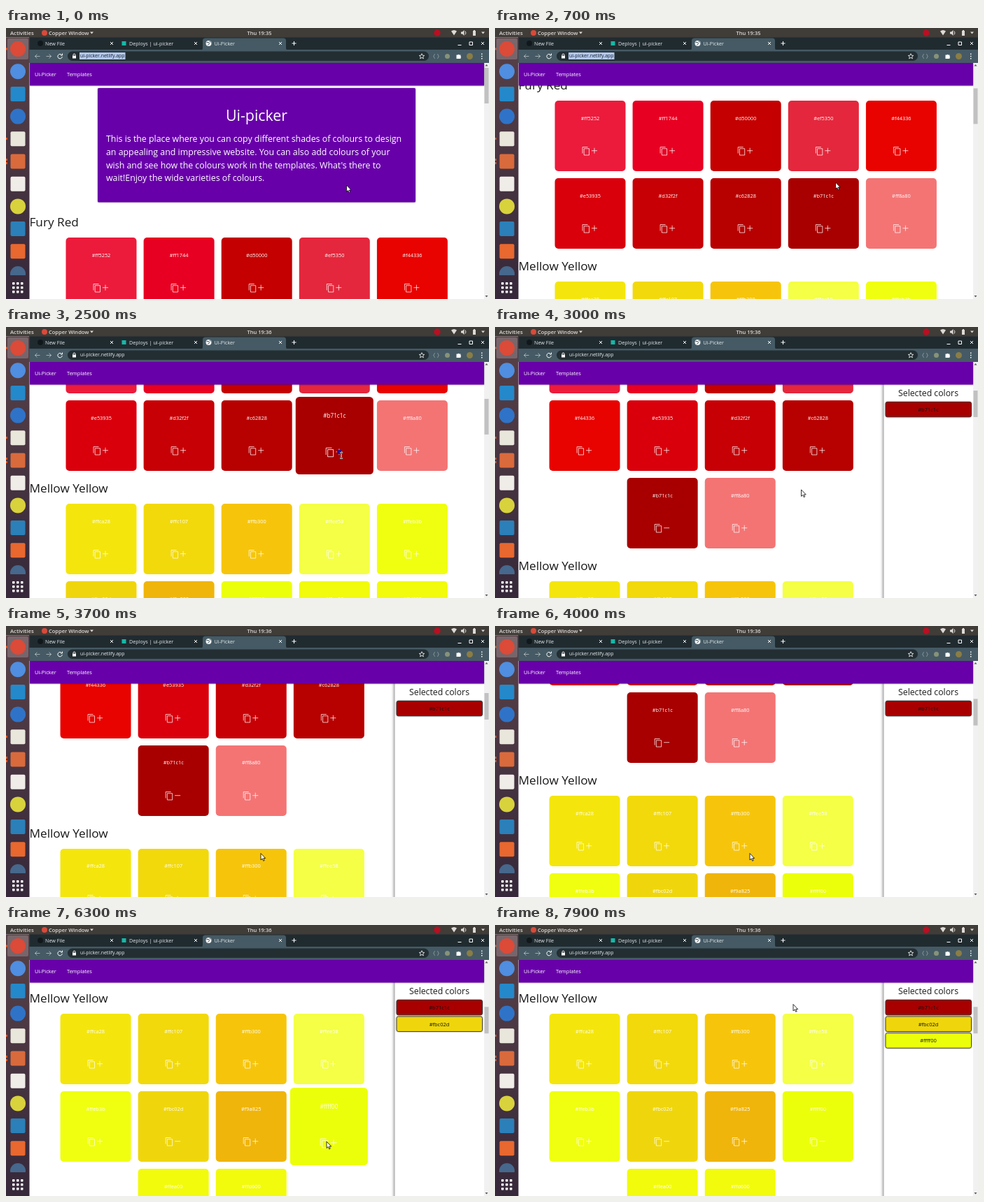
An HTML page for the animation above (8000 ms loop, 690 by 388 pixels).

```html
<!DOCTYPE html>
<html lang="en">
<head>
<meta charset="utf-8">
<title>Ui-Picker</title>
<style>
  html, body { margin: 0; width: 100%; height: 100%; overflow: hidden; background: #fff; }
  svg { display: block; width: 690px; height: 388px; font-family: "Open Sans", "Noto Sans", sans-serif; }
  text { white-space: pre; }
  .mid { text-anchor: middle; }
  .line { fill: none; stroke: #fff; }
  .thin { stroke-width: .8; opacity: .92; }
  .bar { font-size: 7.5px; font-weight: 600; fill: #dedad8; }
  .tab { font-size: 7.2px; fill: #e4eaec; }
  .hex { font-size: 7.4px; fill: #fff; }
  .title { font-size: 17.2px; fill: #1a1a1a; }
  .lift { filter: drop-shadow(0 .5px 1px #0006); }
</style>
</head>
<body>
<svg viewBox="0 0 690 388">
  <defs>
    <linearGradient id="dockFill" x2="0" y2="1">
      <stop stop-color="#584147"/><stop offset="1" stop-color="#36283a"/>
    </linearGradient>
    <clipPath id="dockClip"><path d="M0 13H34V354H0Z"/></clipPath>
  </defs>
  <rect width="690" height="388" fill="#fff"/>

  <g id="page">
    <g id="intro">
      <rect class="lift" x="131" y="86" width="454" height="163.5" rx="1.5" fill="#6800aa"/>
      <text class="mid" x="358" y="133" font-size="21.4" fill="#fff">Ui-picker</text>
      <g id="blurb" font-size="12.36" fill="#fff"></g>
    </g>
  </g>

  <g id="panel">
    <rect x="555.5" y="70" width="128" height="330" fill="#fff" style="filter:drop-shadow(-1px 0 2px #0008)"/>
    <text class="mid" x="619" y="99.3" font-size="12.27" fill="#1a1a1a">Selected colors</text>
  </g>

  <g id="scrollbar">
    <rect x="683" y="50" width="7" height="338" fill="#f1f1f1"/>
    <path d="M684.5 54.5L686.5 52L688.5 54.5Z" fill="#555"/>
    <path d="M684.5 383L686.5 385.5L688.5 383Z" fill="#555"/>
    <rect id="thumb" x="683.5" width="6" fill="#c1c1c1"/>
  </g>

  <rect class="lift" x="34" y="50" width="649" height="32.5" fill="#6800aa"/>
  <g font-size="7.5" fill="#fff">
    <text x="41" y="68.5">Ui-Picker</text><text x="87" y="68.5">Templates</text>
  </g>

  <!-- browser frame -->
  <rect x="33" y="13" width="657" height="19" fill="#202b30"/>
  <path d="M278 32Q281 32 281 28V18Q281 14.5 285 14.5H396Q400 14.5 400 18V28Q400 32 403 32Z" fill="#455a64"/>
  <rect x="33" y="31" width="657" height="19" fill="#455a64"/>
  <rect x="88" y="33.5" width="516" height="13.5" rx="6.75" fill="#232e33"/>
  <circle cx="49" cy="22" r="4" fill="#11181b"/>
  <rect x="165.5" y="19" width="6" height="6" fill="#16b8a6"/>
  <circle cx="289.5" cy="22" r="4" fill="#f1f3f4"/>
  <path d="M286.5 20.5h3l1 2-2 2M291 18.5l1 2" fill="none" stroke="#455a64"/>
  <g class="tab">
    <text x="56" y="24.7">New File</text>
    <text x="176" y="24.7">Deploys | ui-picker</text>
    <text x="297.5" y="24.7">Ui-Picker</text>
  </g>
  <rect id="mark" x="105" y="35" width="65.5" height="10" fill="#b3c8ee"/>
  <text id="url" x="106" y="42.4" font-size="6.95">ui-picker.netlify.app</text>
  <g class="line">
    <path d="M149 20l4 4m0-4l-4 4M269 20l4 4m0-4l-4 4M390 20l4 4m0-4l-4 4M411.5 19v6m-3-3h6"/>
    <path d="M645.5 24.5h5M662 20h4.5v4.500H662ZM679 20l4 4m0-4l-4 4"/>
    <path d="M48.5 40.5h-7m3-3l-3 3 3 3M57.5 40.5h7m-3-3l3 3-3 3" opacity=".5"/>
    <path d="M79.5 38.5a3.2 3.2 0 1 0 .8 2.500M80.5 36.5v2.5h-2.5"/>
    <path d="M96 40v-1.5a1.5 1.5 0 0 1 3 0V40"/>
    <path d="M594 36.7l1.1 2.5 2.6.2-2 1.8.7 2.6-2.4-1.4-2.4 1.4.7-2.6-2-1.8 2.6-.2Z" stroke-width=".8"/>
    <path d="M613 37.5q-1.5 0-1.5 1.5t-1 1.5q1 0 1 1.5t1.5 1.5m3-6q1.5 0 1.5 1.5t1 1.5q-1 0-1 1.5t-1.5 1.5" opacity=".3"/>
  </g>
  <rect x="95" y="39.7" width="5" height="3.8" fill="#fff"/>
  <circle cx="630.5" cy="40.5" r="3.5" fill="#879279"/>
  <path d="M643.5 38.5h2a1.2 1.2 0 0 1 2 0h2v2a1.2 1.2 0 0 1 0 2v1.500h-6Z" fill="#fff"/>
  <circle cx="662.5" cy="40.5" r="4.5" fill="#8a7d45"/>
  <path d="M679 36.5h1.5v1.5H679Zm0 3.2h1.5v1.5H679Zm0 3.2h1.5v1.5H679Z" fill="#fff"/>

  <!-- desktop bar -->
  <rect width="690" height="13.5" fill="#403c38"/>
  <g class="bar">
    <text x="6" y="9.7" font-size="7.7">Activities</text>
    <text x="61" y="9.7">Copper Window</text>
    <text id="clock" class="mid" x="362" y="9.7"></text>
  </g>
  <circle cx="55" cy="7" r="4" fill="#d94a3a"/>
  <path d="M120 5.5h5l-2.5 3ZM679 5.5h5l-2.5 3ZM636 4.5q4-3 8 0l-4 6ZM650 5.5h2l2.5-2.5v8l-2.5-2.5h-2ZM667 4h1V3h2v1h1v7h-4Z" fill="#dedad8"/>
  <path d="M656 4.5q2 2.5 0 5" fill="none" stroke="#dedad8"/>
  <circle cx="616" cy="7" r="4.7" fill="#b90f22"/>

  <!-- dock -->
  <rect y="13.5" width="33.5" height="375" fill="url(#dockFill)"/>
  <rect x="2" y="15" width="30" height="30" rx="2" fill="#fff" opacity=".2"/>
  <g id="dock" clip-path="url(#dockClip)"></g>
  <g id="dots" fill="#fff"></g>
  <path d="M0 28.5h2v3H0ZM0 157h2v3H0ZM0 187h2v3H0Zm0 5h2v3H0Z" fill="#e95420"/>

  <g id="mouse">
    <path id="arrow" d="M0 0V9.500L2.2 7.5L3.7 10.8L5.2 10.1L3.8 7H6.7Z" fill="#fff" stroke="#000" stroke-width=".8"/>
    <g id="beam">
      <rect x="-5" y="-6" width="6" height="6" fill="#35108a"/>
      <g fill="none">
        <path d="M-1 -2q2 0 2 1q0-1 2-1M1 -1v6M-1 6q2 0 2-1q0 1 2 1" stroke="#fff" stroke-width="1.8"/>
        <path d="M-1 -2q2 0 2 1q0-1 2-1M1 -1v6M-1 6q2 0 2-1q0 1 2 1" stroke="#111" stroke-width=".8"/>
      </g>
    </g>
  </g>
</svg>

<script>
const $ = id => document.getElementById(id);
const SIZE = 101, PITCH = 111.1, LOOP = 8000;

function add(parent, tag, attrs, content = '') {
  const el = document.createElementNS('http://www.w3.org/2000/svg', tag);
  for (const key in attrs) el.setAttribute(key, attrs[key]);
  el.textContent = content;
  return parent.appendChild(el);
}
const show = (el, on) => el.setAttribute('visibility', on ? 'visible' : 'hidden');
const clamp = v => Math.max(0, Math.min(1, v));
const ramp = (t, a, b) => clamp((t - a) / (b - a));

// Eased value from rows of [time, ...values]
function track(rows, t) {
  let i = 0;
  while (i < rows.length - 2 && t >= rows[i + 1][0]) i++;
  const a = rows[i], b = rows[i + 1];
  const p = ramp(t, a[0], b[0]), e = p * p * (3 - 2 * p);
  return a.slice(1).map((v, k) => v + (b[k + 1] - v) * e);
}

const scrollTrack = [[100, 0], [650, 196], [900, 196], [1200, 240], [1400, 240],
  [1800, 306], [3200, 306], [3500, 351], [3700, 351], [4400, 543]];
const mouseTrack = [[0, 486.5, 225], [500, 486.5, 221], [1700, 486.5, 221], [2200, 478, 182],
  [2800, 478, 182], [3300, 364, 325.5], [4400, 364, 325.5], [4800, 258, 307], [5700, 258, 307],
  [6300, 458, 310], [7300, 458, 310], [7800, 426, 113.5]];
const picks = { b71c1c: 2800, fbc02d: 5600, ffff00: 6900 };

// label:painted colour
const sections = [
  ['Fury Red', 'ff5252:ec1b3b ff1744:e80022 d50000:c40000 ef5350:e4273c f44336:e80200 ' +
    'e53935:d9000c d32f2f:c70005 c62828:b70000 b71c1c:a80000 ff8a80:f47474'],
  ['Mellow Yellow', 'ffca28:f4e60c ffc107:f2d90c ffb300:f6c50b ffee58:f4ff45 ffeb3b:f0ff10 ' +
    'fbc02d:efd60c f9a825:f0b50a ffff00:ecff0a ffea00:f2fb0c ffd600:f2fb0c']
].map(([name, list]) => ({
  title: add($('page'), 'text', { class: 'title', x: 33.5 }, name),
  cards: list.split(' ').map(pair => makeCard(...pair.split(':')))
}));

function makeCard(name, fill) {
  const g = add($('page'), 'g', {});
  add(g, 'rect', { width: SIZE, height: SIZE, rx: 5, fill: '#' + fill });
  add(g, 'text', { class: 'hex mid', x: 50.5, y: 27.5 }, '#' + name);
  add(g, 'path', { class: 'line thin', d: 'M39.5 75.5V66.5H47M41.7 68.7H49V78H41.7Z' });
  const sign = add(g, 'path', { class: 'line thin' });
  return { name, fill, g, sign };
}

const all = sections.flatMap(s => s.cards);
const chips = Object.keys(picks).map((name, i) => {
  const g = add($('panel'), 'g', { transform: `translate(558 ${107.3 + i * 23.7})` });
  const fill = '#' + all.find(c => c.name === name).fill;
  add(g, 'rect', { class: 'lift', width: 122.5, height: 21.5, rx: 2.5, fill, stroke: '#222', 'stroke-width': .8 });
  add(g, 'text', { class: 'mid', x: 61, y: 13.5, 'font-size': 7.5, fill: '#111' }, '#' + name);
  return { g, at: picks[name] };
});

['This is the place where you can copy different shades of colours to design',
  'an appealing and impressive website. You can also add colours of your',
  'wish and see how the colours work in the templates. What\'s there to',
  'wait!Enjoy the wide varieties of colours.'
].forEach((line, i) => add($('blurb'), 'text', { x: 143, y: 163.2 + i * 18.7 }, line));

// Dock icons: round or square, top to bottom
'o:dc4a38 o:4f8ee0 s:2489ca o:2f73c8 s:e9e6dc s:d96a3c s:f0ece8 o:d8d23c s:2b80b9 s:e8682f o:46688c'
  .split(' ').forEach((icon, i) => {
    const [shape, fill] = icon.split(':');
    const y = 30 + i * 32.2;
    if (shape === 'o') add($('dock'), 'circle', { cx: 17, cy: y, r: 11, fill: '#' + fill });
    else add($('dock'), 'rect', { x: 6.5, y: y - 10.5, width: 21, height: 21, rx: 2, fill: '#' + fill });
  });
for (let i = 0; i < 9; i++)
  add($('dots'), 'rect', { x: 9 + i % 3 * 6, y: 364 + Math.floor(i / 3) * 6, width: 3.5, height: 3.5, rx: .7 });

function draw(t) {
  const [scroll] = track(scrollTrack, t), [mx, my] = track(mouseTrack, t);
  const open = t >= picks.b71c1c;
  const cols = open ? 4 : 5, centre = open ? 294.7 : 358.2;
  const hover = ramp(t, 1800, 2000) - ramp(t, 2800, 2900) + ramp(t, 4500, 4700);

  $('intro').setAttribute('transform', `translate(0 ${-scroll})`);
  let top = 300 - scroll;
  for (const { title, cards } of sections) {
    title.setAttribute('y', top - 16);
    cards.forEach((card, i) => {
      const row = Math.floor(i / cols), count = Math.min(cols, cards.length - row * cols);
      const x = centre + (i % cols - (count - 1) / 2) * PITCH, y = top + row * 111 + SIZE / 2;
      const depth = SIZE / 2 - Math.max(Math.abs(mx - x), Math.abs(my - y));
      const scale = 1 + .1 * hover * clamp(depth / 10);
      card.g.setAttribute('transform', `translate(${x} ${y}) scale(${scale}) translate(-50.5 -50.5)`);
      card.sign.setAttribute('d', 'M52.5 71.7h8' + (t >= picks[card.name] ? '' : 'M56.5 67.7v8'));
    });
    top += Math.ceil(cards.length / cols) * 111 + 37;
  }

  show($('panel'), open);
  chips.forEach(chip => show(chip.g, t >= chip.at));
  $('thumb').setAttribute('y', 57 + scroll * (open ? .111 : .15));
  $('thumb').setAttribute('height', open ? 38 : 51);

  const marked = t < 2000;
  show($('mark'), marked);
  $('url').setAttribute('fill', marked ? '#17242c' : '#e8eef0');
  $('clock').textContent = t < 1000 ? 'Thu 19:35' : 'Thu 19:36';

  const beam = t >= 2200 && t < 2800;
  $('mouse').setAttribute('transform', `translate(${mx} ${my})`);
  show($('beam'), beam);
  show($('arrow'), !beam);
}

const start = performance.now();
(function frame() {
  draw((performance.now() - start) % LOOP);
  requestAnimationFrame(frame);
})();
</script>
</body>
</html>
```
